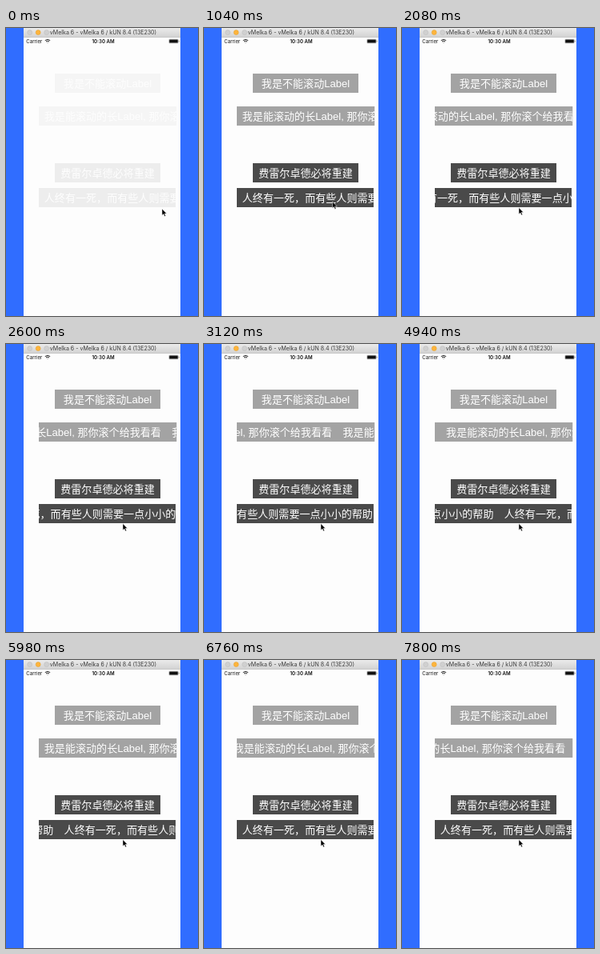
Animation, 240 px wide and 360 px high, one loop 8000 ms. Source, as an HTML page:

```html
<!DOCTYPE html>
<html lang="zh-CN">
<head>
<meta charset="utf-8">
<title>Scrolling labels</title>
<style>
html, body { margin: 0; width: 100%; height: 100%; overflow: hidden; background: #306dff; }
svg { display: block; }
.label { font: 13.07px "Liberation Sans", "Noto Sans CJK SC", "Noto Sans CJK", sans-serif; fill: #fff; }
.status { font: 6.1px Inter, sans-serif; fill: #111; }
.time { font-weight: 600; }
.title { font: 7.05px Inter, sans-serif; fill: #3c3c3c; }
</style>
</head>
<body>
<svg width="240" height="360" viewBox="0 0 240 360">
  <defs>
    <linearGradient id="bar" x2="0" y2="1">
      <stop stop-color="#ebebeb"/><stop offset="1" stop-color="#d3d3d3"/>
    </linearGradient>
  </defs>
  <rect width="240" height="360" fill="#306dff"/>
  <rect x="22" width="196" height="360" fill="#fdfdfd"/>

  <rect x="22" width="196" height="11" fill="url(#bar)"/>
  <rect x="22" y="11" width="196" height="1" fill="#c8c8c8"/>
  <g stroke-width=".5">
    <circle cx="29.7" cy="5.6" r="3" fill="#d0d0d0" stroke="#bababa"/>
    <circle cx="40.2" cy="5.6" r="3" fill="#fdb43c" stroke="#e0a033"/>
    <circle cx="50.7" cy="5.6" r="3" fill="#d0d0d0" stroke="#bababa"/>
  </g>
  <text class="title" x="121.5" y="8.1" text-anchor="middle">vMelka 6 - vMelka 6 / kUN 8.4 (13E230)</text>

  <text class="status" x="25.3" y="18.8">Carrier</text>
  <g fill="none" stroke="#111" stroke-width=".9">
    <path d="M48.8 15.6Q52 12.9 55.2 15.6M50 17Q52 15.3 54 17"/>
    <circle cx="52" cy="18.3" r=".45" fill="#111" stroke="none"/>
  </g>
  <text class="status time" x="121.5" y="18.8" text-anchor="middle">10:30 AM</text>
  <rect x="203.7" y="14.1" width="11.6" height="4.8" rx=".9" fill="none" stroke="#777" stroke-width=".4"/>
  <rect x="204.2" y="14.6" width="10.6" height="3.8" rx=".5" fill="#111"/>
  <rect x="215.8" y="15.7" width=".7" height="1.6" fill="#555"/>

  <g id="labels"></g>
  <path id="cursor" d="M0 0V8.2L1.9 6.5L3.2 9.4L4.6 8.8L3.3 6H5.8Z" fill="#000" stroke="#fff" stroke-width=".5"/>
</svg>
<script>
const LOOP = 8000, STEP = 260, GRAY = '#a3a3a3', DARK = '#4a4a4a', BASELINE = 16.5;
const group = document.getElementById('labels');
const cursor = document.getElementById('cursor');

function add(parent, tag, attrs, text = '') {
  const el = document.createElementNS('http://www.w3.org/2000/svg', tag);
  for (const key in attrs) el.setAttribute(key, attrs[key]);
  el.textContent = text;
  return parent.appendChild(el);
}

function box(x, y, width, fill) {
  const view = add(group, 'svg', { x, y, width, height: 24, overflow: 'hidden' });
  add(view, 'rect', { width, height: 24, fill });
  return view;
}

function fixed(y, fill, text) {
  add(box(61, y, 132, fill), 'text', { class: 'label', x: 66, y: BASELINE, 'text-anchor': 'middle' }, text);
}

// Two copies of the text, one period apart, slide left together.
function marquee(y, width, fill, text, period, starts, duration) {
  const strip = add(box(41, y, width, fill), 'g', {});
  for (const x of [6.8, 6.8 + period]) add(strip, 'text', { class: 'label', x, y: BASELINE }, text);
  return t => {
    const start = starts.filter(s => s <= t).pop() ?? t;
    const p = (t - start) / duration;
    strip.setAttribute('transform', `translate(${p < 1 ? -p * period : 0})`);
  };
}

fixed(57, GRAY, '我是不能滚动Label');
fixed(169, DARK, '费雷尔卓德必将重建');
const scrollers = [
  marquee(98, 172.5, GRAY, '我是能滚动的长Label, 那你滚个给我看看', 248.6, [1232, 6590], 3820),
  marquee(200, 171, DARK, '人终有一死，而有些人则需要一点小小的帮助', 274.5, [1268], 5180)
];

const path = [[0, 195, 226], [1040, 160.5, 217], [2080, 146, 224.5]];

function moveCursor(t) {
  let i = 0;
  while (i < path.length - 2 && t > path[i + 1][0]) i++;
  const [t0, x0, y0] = path[i], [t1, x1, y1] = path[i + 1];
  const p = Math.min(1, (t - t0) / (t1 - t0));
  cursor.setAttribute('transform', `translate(${x0 + (x1 - x0) * p} ${y0 + (y1 - y0) * p})`);
}

function draw(now) {
  const t = Math.floor(now % LOOP / STEP) * STEP;
  group.setAttribute('opacity', Math.min(1, 0.09 + t / 285));
  scrollers.forEach(scroll => scroll(t));
  moveCursor(t);
}

const began = performance.now();
function tick() {
  draw(performance.now() - began);
  requestAnimationFrame(tick);
}
tick();
</script>
</body>
</html>
```
